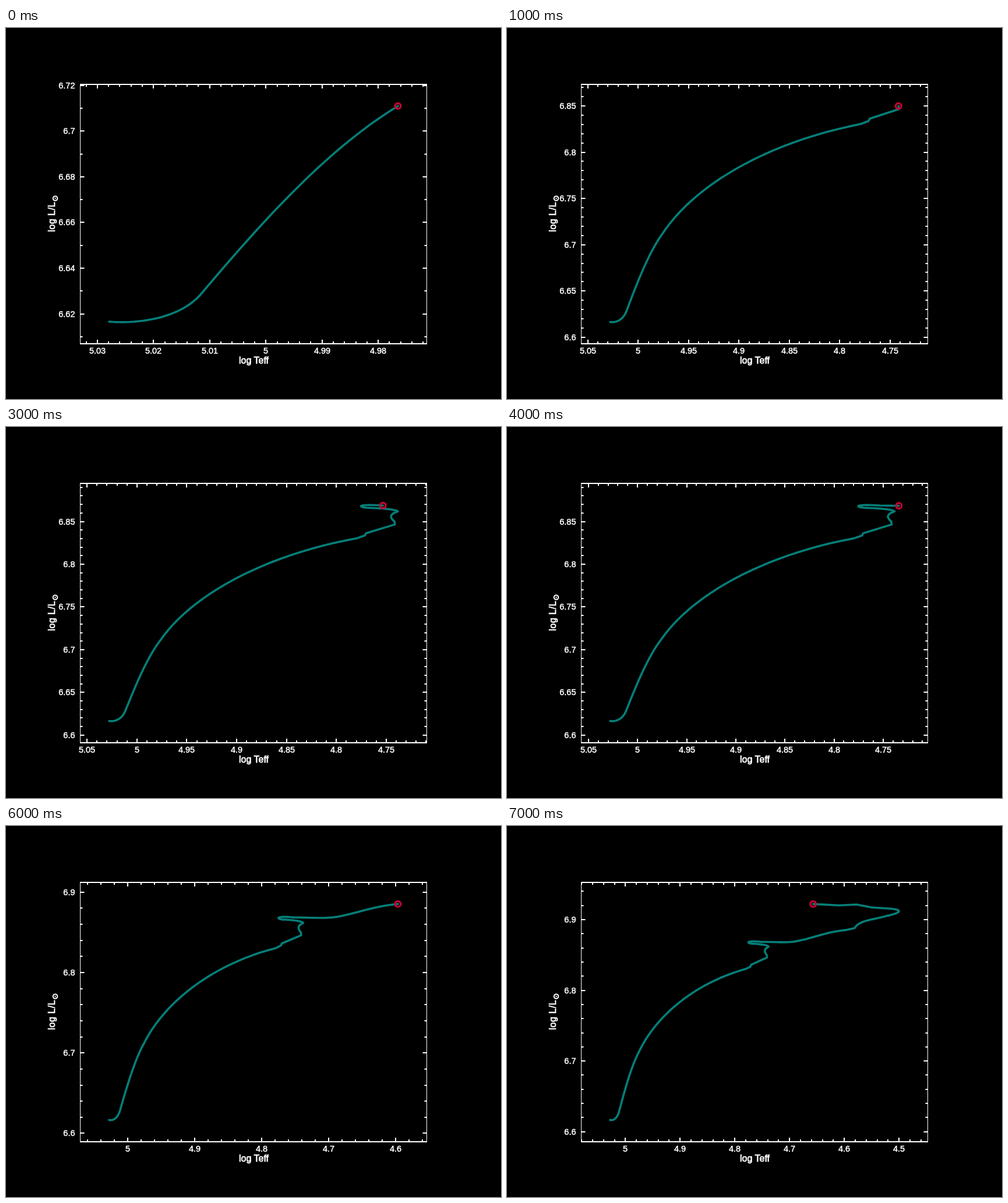
An HTML page for the animation above (8 s loop, 850 px wide and 638 px high).

```html
<!DOCTYPE html>
<html lang="en">
<head>
<meta charset="utf-8">
<title>Luminosity against temperature</title>
<style>
html, body { margin: 0; width: 100%; height: 100%; overflow: hidden; background: #000; }
svg { display: block; }
text { font-family: "Liberation Sans", Arial, sans-serif; fill: #fff; stroke: #fff; stroke-width: .5px; }
.num { font-size: 14.5px; }
.name { font-size: 16px; stroke-width: .75px; }
.line { fill: none; stroke: #fff; stroke-width: 2; }
.thin { stroke-width: 1; }
#track { fill: none; stroke: #057f79; stroke-width: 3.6; stroke-linejoin: round; stroke-linecap: round; }
#spot { fill: none; stroke: #c60432; stroke-width: 3.3; }
</style>
</head>
<body>
<svg width="850" height="638" viewBox="0 0 850 638">
  <rect width="850" height="638"/>
  <path id="track"/>
  <circle id="spot" r="4.8"/>
  <path class="line" d="M127 97H723M127 543H723"/>
  <path class="line thin" d="M127.5 97V543M722.5 97V543"/>
  <path id="ticks" class="line"/>
  <g id="labels" class="num"></g>
  <text class="name" x="425.5" y="576.5" text-anchor="middle">log Teff</text>
  <g transform="translate(83.5 350.5) rotate(-90)">
    <text class="name" letter-spacing=".5">log L/L</text>
    <circle class="line" cx="57.5" cy="1" r="3.8"/>
    <circle cx="57.5" cy="1" r="1.2" fill="#fff"/>
  </g>
</svg>
<script>
const STEP = 1000;
const box = { left: 127.5, right: 722.5, top: 97, bottom: 543 };
const $ = id => document.getElementById(id);

// Track in (log Teff, log L). Each row is added by one step; each item is a
// Bezier curve that goes on from the last point (one pair is a straight line).
const origin = [5.0279, 6.6166];
const rows = [
  [[5.0239,6.6157, 5.0152,6.6169, 5.0112,6.6297], [5.0017,6.6572, 4.9897,6.6912, 4.9765,6.711]],
  [[4.9463,6.7621, 4.8757,6.8098, 4.779,6.8305], [4.7714,6.8337], [4.7703,6.8362],
   [4.7413,6.8465], [4.7417,6.8499]],
  [[4.7462,6.8547, 4.7474,6.8581, 4.7383,6.8618], [4.7421,6.8651, 4.7687,6.866]],
  [[4.7794,6.867, 4.7788,6.8707, 4.7533,6.8687]],
  [[4.734,6.8684]],
  [[4.7078,6.8676, 4.695,6.8686]],
  [[4.6626,6.8718, 4.6383,6.8823, 4.597,6.8853]],
  [[4.5809,6.8881], [4.5734,6.8992, 4.5457,6.9, 4.5223,6.9053],
   [4.4947,6.9099, 4.4926,6.9144, 4.5181,6.9156],
   [4.55,6.9173], [4.5777,6.9214], [4.6096,6.9202], [4.6569,6.9221]]
];

const mix = (a, b, t) => a.map((v, i) => v + (b[i] - v) * t);

function bezier(pts, t) {
  while (pts.length > 1) pts = pts.slice(1).map((p, i) => mix(pts[i], p, t));
  return pts[0];
}

function trace(step) {
  const out = [origin];
  for (const curve of rows.slice(0, step + 1).flat()) {
    const pts = [out[out.length - 1]];
    for (let i = 0; i < curve.length; i += 2) pts.push([curve[i], curve[i + 1]]);
    const n = pts.length > 2 ? 24 : 1;
    for (let k = 1; k <= n; k++) out.push(bezier(pts, k / n));
  }
  return out;
}

// Smallest 1, 2 or 5 times a power of ten that is not below v.
function roundUp(v) {
  const p = 10 ** Math.floor(Math.log10(v));
  const lead = [1, 2, 5, 10].find(n => n * p >= v);
  return { size: lead * p, parts: lead === 2 ? 2 : 5 };
}

// Axis with a tenth of the data range as margin at both ends.
function makeAxis(values, from, to, spacing) {
  const min = Math.min(...values), max = Math.max(...values);
  const pad = (max - min) / 10;
  const lo = min - pad, hi = max + pad;
  const place = v => from + (v - lo) / (hi - lo) * (to - from);
  const major = roundUp((hi - lo) * spacing);
  const minor = major.size / major.parts;
  const ticks = [];
  for (let i = Math.ceil(lo / minor); i * minor <= hi; i++) {
    const big = i % major.parts === 0;
    ticks.push({
      at: Math.round(place(i * minor)), big,
      size: big ? 7 : 4,
      label: String(+(i * minor).toFixed(3))
    });
  }
  return { place, ticks };
}

const text = (x, y, anchor, s) => `<text x="${x}" y="${y}" text-anchor="${anchor}">${s}</text>`;

function draw(step) {
  const data = trace(step);
  const ax = makeAxis(data.map(p => p[0]), box.right, box.left, .12);
  const ay = makeAxis(data.map(p => p[1]), box.bottom, box.top, .16);
  const pts = data.map(([x, y]) => [ax.place(x).toFixed(2), ay.place(y).toFixed(2)]);
  const [cx, cy] = pts[pts.length - 1];
  $("track").setAttribute("d", "M" + pts.join("L"));
  $("spot").setAttribute("cx", cx);
  $("spot").setAttribute("cy", cy);

  let d = "", labels = "";
  for (const t of ax.ticks) {
    d += `M${t.at} ${box.top}v${t.size}M${t.at} ${box.bottom}v${-t.size}`;
    if (t.big) labels += text(t.at, 560, "middle", t.label);
  }
  for (const t of ay.ticks) {
    d += `M${box.left} ${t.at}h${t.size}M${box.right} ${t.at}h${-t.size}`;
    if (t.big) labels += text(118.5, t.at + 5, "end", t.label);
  }
  $("ticks").setAttribute("d", d);
  $("labels").innerHTML = labels;
}

let shown = 0;
const start = performance.now();
draw(0);
function tick() {
  const step = Math.floor((performance.now() - start) / STEP) % rows.length;
  if (step !== shown) draw(shown = step);
  requestAnimationFrame(tick);
}
requestAnimationFrame(tick);
</script>
</body>
</html>
```
